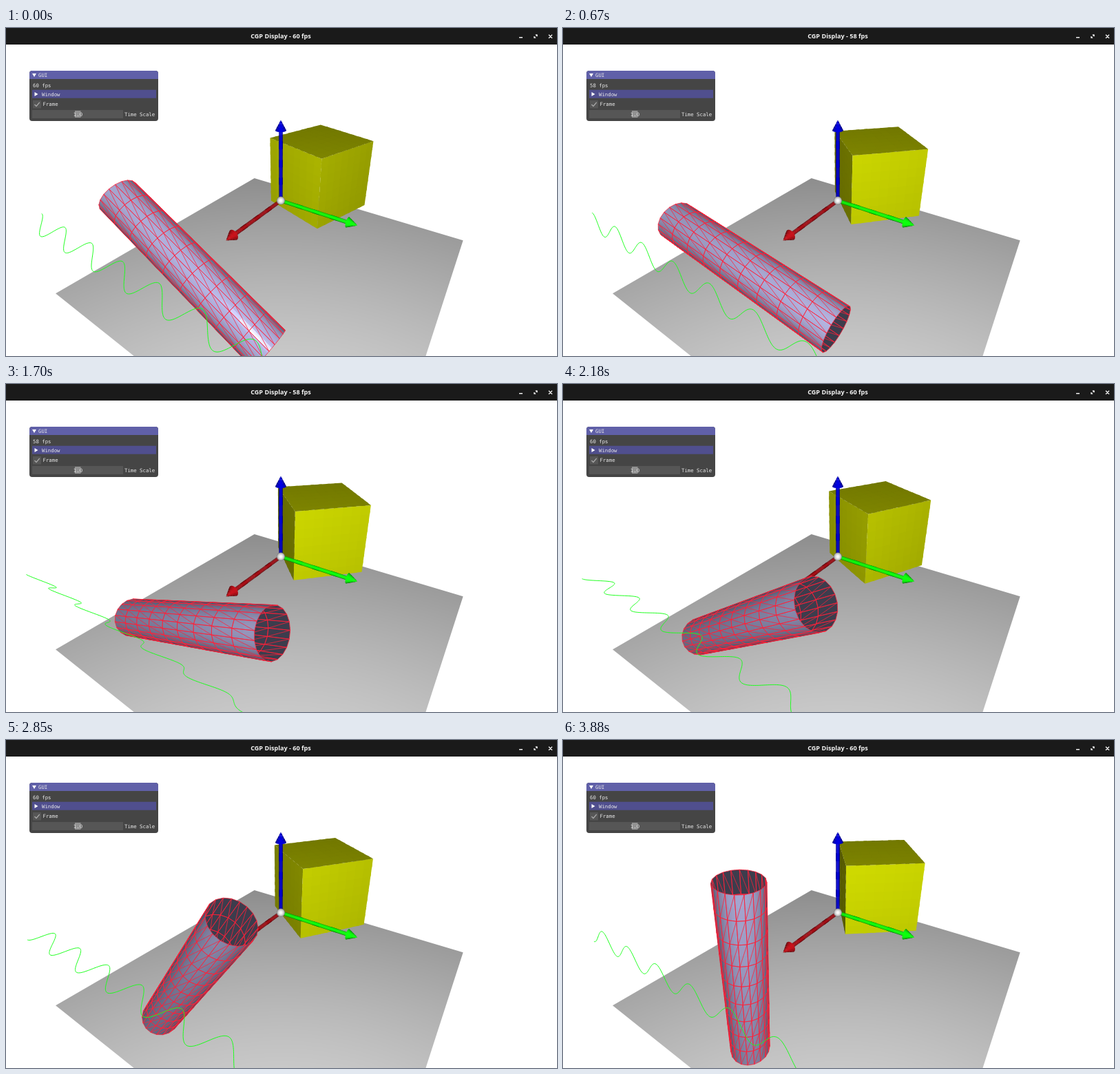
An HTML page with a canvas that plays this animation: 800 by 476 pixels, repeating every 3910 ms.

```html
<!DOCTYPE html>
<html lang="en">
<head>
<meta charset="utf-8">
<title>CGP Display</title>
<style>
html, body { margin: 0; width: 100%; height: 100%; overflow: hidden; background: #fff; }
canvas { display: block; width: 800px; height: 476px; }
</style>
</head>
<body>
<canvas id="stage" width="800" height="476"></canvas>
<script>
const W = 800, H = 476, LOOP = 3910, TAU = Math.PI * 2;
const ctx = document.getElementById('stage').getContext('2d');

// --- vectors and camera ---
const dot = (a, b) => a[0] * b[0] + a[1] * b[1] + a[2] * b[2];
const mix = (a, b, k) => a + (b - a) * k;
const along = (p, d, s) => [p[0] + d[0] * s, p[1] + d[1] * s, p[2] + d[2] * s];
const sub = (a, b) => along(a, b, -1);
const unit = a => { const l = Math.hypot(...a); return a.map(c => c / l); };
const cross = (a, b) => [a[1] * b[2] - a[2] * b[1], a[2] * b[0] - a[0] * b[2], a[0] * b[1] - a[1] * b[0]];

const EYE = [3, 2, 2], CX = 399, CY = 250.5, FOCAL = 486;
const back = unit(EYE), right = unit(cross([0, 0, 1], back)), up = cross(back, right);

function project(p) {
  const q = sub(p, EYE), k = FOCAL / -dot(q, back);
  return [CX + dot(q, right) * k, CY - dot(q, up) * k];
}

// Adds a polyline to the current path
function trace(points, closed) {
  points.forEach((p, i) => i ? ctx.lineTo(...project(p)) : ctx.moveTo(...project(p)));
  if (closed) ctx.closePath();
}

// Phong shading with the light at the eye
function shade(p, n, color) {
  const c = Math.max(0, dot(n, unit(sub(EYE, p))));
  const spec = 0.3 * Math.pow(Math.max(0, 2 * c * c - 1), 64);
  const rgb = color.map(v => Math.min(255, Math.round(255 * (v * (0.3 + 0.6 * c) + spec))));
  return `rgb(${rgb})`;
}

// point(u, v) gives [position, normal]; side 1 draws the outside, -1 the inside.
// Cells reach a little under the next ones, so no seams show.
function surface(point, nu, nv, color, side = 1) {
  const reach = 1.4;
  for (let i = 0; i < nu; i++) for (let j = 0; j < nv; j++) {
    const [p, n] = point((i + 0.5) / nu, (j + 0.5) / nv);
    if (dot(n, sub(EYE, p)) * side <= 0) continue;
    const at = (a, b) => point((i + a) / nu, Math.min(1, (j + b) / nv))[0];
    ctx.beginPath();
    trace([at(0, 0), at(reach, 0), at(reach, reach), at(0, reach)], true);
    ctx.fillStyle = shade(p, n, color);
    ctx.fill();
  }
}

// --- ground ---
const ground = document.createElement('canvas');
ground.width = W;
ground.height = H;
(function paintGround() {
  const g = ground.getContext('2d'), img = g.createImageData(W, H);
  for (let y = 0; y < H; y++) for (let x = 0; x < W; x++) {
    const ray = along(along(sub([0, 0, 0], back), right, (x - CX) / FOCAL), up, (CY - y) / FOCAL);
    const c = Math.max(0, -unit(ray)[2]), k = (y * W + x) * 4;
    img.data[k] = img.data[k + 1] = img.data[k + 2] = 255 * (0.3 + 0.6 * c);
    img.data[k + 3] = 255;
  }
  g.putImageData(img, 0, 0);
})();

function drawGround() {
  ctx.save();
  ctx.beginPath();
  trace([[-2, -2, -1], [2, -2, -1], [2, 2, -1], [-2, 2, -1]], true);
  ctx.clip();
  ctx.drawImage(ground, 0, 0);
  ctx.restore();
}

// --- cube ---
function drawCube(t) {
  const turn = Math.cos(2.97 * t + 1.865), center = [-1, 0, 0], z = [0, 0, 1];
  const face = (n, a, b) => surface((u, v) =>
    [along(along(along(center, n, 0.5), a, Math.min(1, u) - 0.5), b, v - 0.5), n], 8, 8, [0.95, 1, 0]);
  const dir = a => [Math.cos(a), Math.sin(a), 0];
  for (let k = 0; k < 4; k++) {
    const n = dir(turn + k * TAU / 4);
    face(n, cross(z, n), z);
  }
  face(z, dir(turn), dir(turn + TAU / 4));
}

// --- axes ---
function revolve(axis, from, to, r0, r1, color) {
  const e1 = axis[0] ? [0, 1, 0] : [1, 0, 0], e2 = cross(axis, e1);
  const slope = (r0 - r1) / (to - from);
  surface((u, v) => {
    const d = along(e1.map(c => c * Math.cos(u * TAU)), e2, Math.sin(u * TAU));
    return [along(along([0, 0, 0], axis, mix(from, to, v)), d, mix(r0, r1, v)), unit(along(d, axis, slope))];
  }, 24, 4, color);
}

const AXIS_COLORS = [[0.88, 0.08, 0.12], [0.06, 1.18, 0.06], [0, 0, 1]];

function drawAxes() {
  AXIS_COLORS.forEach((color, k) => {
    const axis = [0, 1, 2].map(i => +(i === k));
    revolve(axis, 0, 0.9, 0.022, 0.022, color);
    revolve(axis, 0.885, 1, 0.061, 0, color);
  });
  const [x, y] = project([0, 0, 0]);
  const g = ctx.createRadialGradient(x, y, 0, x, y, 6);
  g.addColorStop(0, '#fff');
  g.addColorStop(0.35, '#eee');
  g.addColorStop(0.75, '#c0c0c0');
  g.addColorStop(1, '#777');
  ctx.fillStyle = g;
  ctx.beginPath();
  ctx.arc(x, y, 6, 0, TAU);
  ctx.fill();
}

// --- cylinder with wireframe ---
const SIDES = 19, RINGS = 9, RADIUS = 0.2;

function drawCylinder(t) {
  const a = 118 / 180 * Math.PI - 0.5 * t;
  const axis = [0, Math.sin(a), Math.cos(a)], e2 = [0, Math.cos(a), -Math.sin(a)];
  const radial = k => [Math.cos(k * TAU / SIDES), ...e2.slice(1).map(c => c * Math.sin(k * TAU / SIDES))];
  const spokes = Array.from({ length: SIDES + 1 }, (_, k) => radial(k));
  const point = (u, v) => {
    const s = u * SIDES, k = Math.min(SIDES - 1, Math.floor(s + 1e-9)), f = s - k;
    const d = spokes[k].map((c, i) => mix(c, spokes[k + 1][i], f));
    return [along(along([1.5, 0, 0], axis, 2 * v - 1), d, RADIUS), unit(d)];
  };
  for (const side of [-1, 1]) {
    surface(point, SIDES * 4, RINGS * 2, [0.8, 0.8, 1], side);
    // One path for all edges, so shared ones are not inked twice
    ctx.beginPath();
    for (let i = 0; i < SIDES; i++) {
      const [p, n] = point((i + 0.5) / SIDES, 0.5);
      if (dot(n, sub(EYE, p)) * side <= 0) continue;
      for (let j = 0; j < RINGS; j++) {
        const at = (x, y) => point((i + x) / SIDES, (j + y) / RINGS)[0];
        trace([at(0, 0), at(1, 0), at(1, 1), at(0, 1), at(0, 0), at(1, 1)]);
      }
    }
    ctx.strokeStyle = '#ff2038';
    ctx.lineWidth = 0.75;
    ctx.lineJoin = 'round';
    ctx.stroke();
  }
}

// --- wave turning around its own line ---
function drawWave(t) {
  const a = 144 / 180 * Math.PI - 1.005 * t, points = [];
  for (let k = 0; k <= 400; k++) {
    const y = -2 + k / 100, h = 0.1 * Math.cos(2 * TAU * y);
    points.push([1.9 + h * Math.cos(a), y, h * Math.sin(a)]);
  }
  ctx.beginPath();
  trace(points);
  ctx.strokeStyle = '#1cff1c';
  ctx.lineWidth = 1;
  ctx.stroke();
}

// --- window chrome and panel ---
function box(x, y, w, h, color, r = 0) {
  ctx.fillStyle = color;
  ctx.beginPath();
  ctx.roundRect(x, y, w, h, r);
  ctx.fill();
}

function lines(color, width, ...paths) {
  ctx.strokeStyle = color;
  ctx.lineWidth = width;
  ctx.beginPath();
  for (const p of paths) p.forEach(([x, y], i) => i ? ctx.lineTo(x, y) : ctx.moveTo(x, y));
  ctx.stroke();
}

function triangle(...pts) {
  ctx.fillStyle = '#fff';
  ctx.beginPath();
  for (const p of pts) ctx.lineTo(...p);
  ctx.fill();
}

function label(text, x, y, align = 'left') {
  ctx.font = '7.35px "DejaVu Sans Mono", monospace';
  ctx.textAlign = align;
  ctx.fillStyle = '#e8e8e8';
  ctx.fillText(text, x, y);
}

function drawTitle(fps) {
  box(0, 0, W, 24, '#1a1a1a');
  ctx.font = 'bold 9.1px "Noto Sans", sans-serif';
  ctx.textAlign = 'center';
  ctx.fillStyle = '#f4f4f4';
  ctx.fillText(`CGP Display - ${fps} fps`, 399, 15.3);
  lines('#eee', 1.4, [[745, 13.7], [750, 13.7]], [[788, 9.7], [793, 14.7]], [[793, 9.7], [788, 14.7]]);
  lines('#eee', 1.1, [[768.8, 9.9], [771.2, 9.9], [771.2, 12.3]], [[766.8, 11.9], [766.8, 14.3], [769.2, 14.3]],
    [[771, 10.1], [769.6, 11.5]], [[767, 14.1], [768.4, 12.7]]);
}

function drawPanel(fps) {
  box(34, 62, 187, 73, '#454545', 4);
  box(34, 62, 187, 12, '#6060a8', [4, 4, 0, 0]);
  triangle([38, 66], [44, 66], [41, 71]);
  label('GUI', 47, 70.8);
  label(`${fps} fps`, 39, 86);
  box(38, 89.7, 180, 12.1, '#504f8e');
  triangle([41.5, 93], [41.5, 99], [46.5, 96]);
  label('Window', 52, 98.6);
  box(39, 105, 12, 11.5, '#565656');
  lines('#a8a8a8', 1.3, [[41.5, 111], [44, 113.5], [48.8, 107.8]]);
  label('Frame', 53.5, 113);
  box(38, 119, 132, 12, '#565656');
  box(100, 120, 8.5, 10, '#929292');
  label('1.0', 104.5, 127.5, 'center');
  label('Time Scale', 172, 127.5);
}

function frame() {
  const ms = performance.now() % LOOP, t = ms / 1000;
  const fps = ms >= 400 && ms < 1950 ? 58 : 60;
  ctx.fillStyle = '#fff';
  ctx.fillRect(0, 0, W, H);
  drawGround();
  drawCube(t);
  drawAxes();
  drawCylinder(t);
  drawWave(t);
  drawTitle(fps);
  drawPanel(fps);
  requestAnimationFrame(frame);
}
frame();
</script>
</body>
</html>
```
